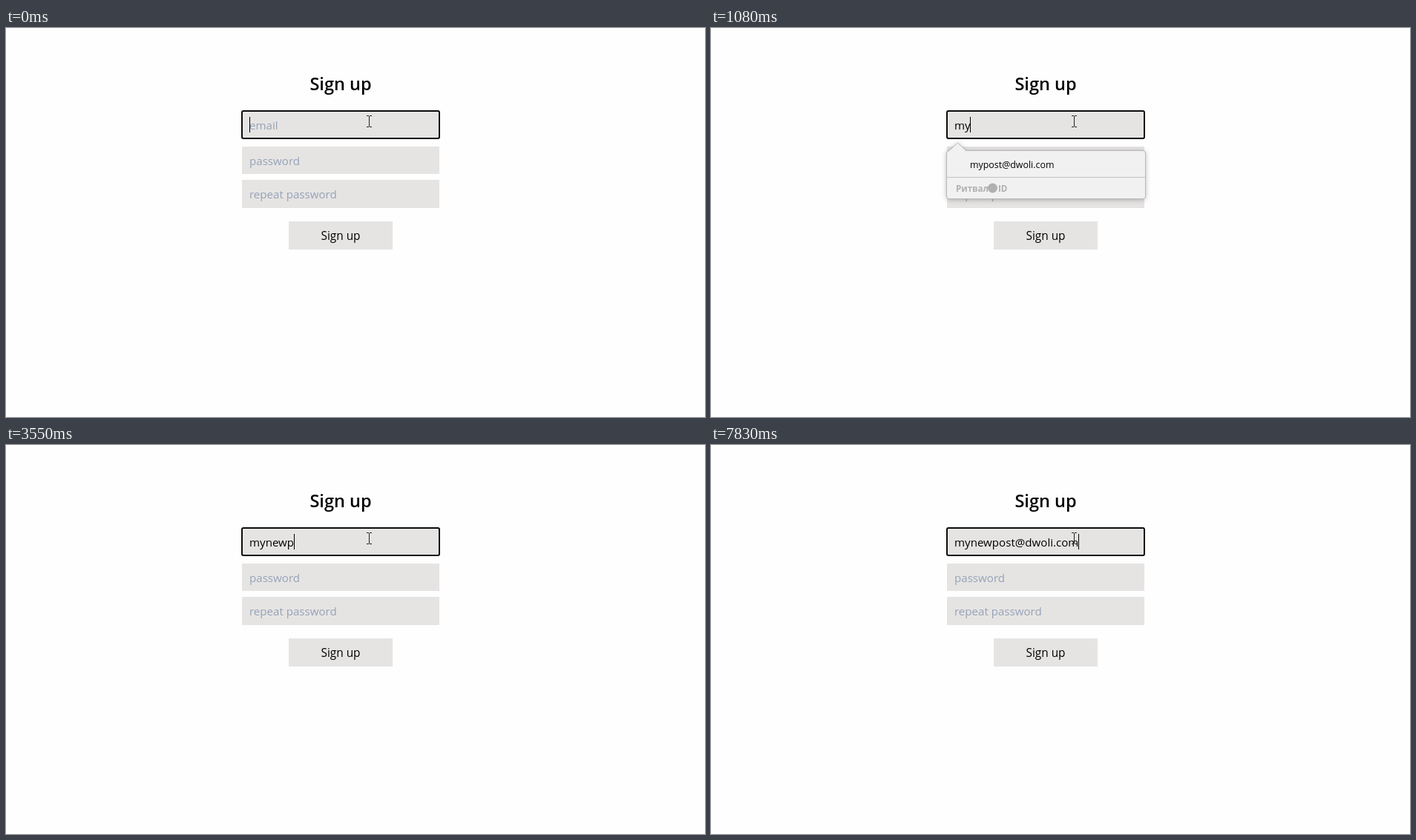
Recreate the animation shown at these times as an HTML page. Size 942x525 px, loop 8000 ms.

```html
<!DOCTYPE html>
<html lang="en">
<head>
<meta charset="utf-8">
<title>Sign up</title>
<style>
  html, body { margin: 0; width: 100%; height: 100%; overflow: hidden; background: #fefefe; }
  svg { display: block; width: 942px; height: 525px; font: 15.1px "Open Sans", "Noto Sans", sans-serif; }
  .box { fill: #e6e4e3; }
  .hint { fill: #94a3b8; }
  .mid { text-anchor: middle; }
  #popup { filter: drop-shadow(0 1px 3px rgba(0, 0, 0, .26)); }
  .panel { fill: #f1f1f1; stroke: #b8b8b8; }
  .brand { font-size: 11.6px; font-weight: 700; fill: #b0b0b0; }
</style>
</head>
<body>
<svg viewBox="0 0 942 525">
  <text class="mid" x="451" y="84" font-size="23.5" font-weight="600">Sign up</text>

  <rect class="box" x="318" y="112" width="266" height="37" rx="2" stroke="#0c0c0f" stroke-width="2"/>
  <rect class="box" x="318" y="160" width="266" height="37"/>
  <rect class="box" x="318" y="205" width="266" height="38"/>
  <rect class="box" x="381" y="261" width="140" height="38"/>

  <text id="email" x="328" y="137"></text>
  <text class="hint" x="328" y="185">password</text>
  <text class="hint" x="328" y="230">repeat password</text>
  <text class="mid" x="451" y="286" font-size="15.4">Sign up</text>
  <rect id="caret" y="120" width="1" height="21"/>

  <g id="popup">
    <rect class="panel" x="317.5" y="165.5" width="268" height="65" rx="3.5"/>
    <path class="panel" d="M320.5 166 L332.5 155 L344 166"/>
    <path d="M318 201.5 H585" stroke="#c2c2c2"/>
    <text x="349" y="189" font-size="12.4">mypost@dwoli.com</text>
    <text class="brand" x="330" y="220.5">Ритвал</text>
    <circle cx="379.5" cy="216" r="6.5" fill="#b0b0b0"/>
    <text class="brand" x="387" y="220.5">ID</text>
  </g>

  <path d="M486 118.5 h3 m1 0 h3 M489.5 119 V133 M486 133.5 h3 m1 0 h3" fill="none" stroke="#222"/>
</svg>
<script>
const LOOP = 8000, BLINK = 530, STEP = 70;
const ADDRESS = "mynewpost@dwoli.com";

// When each letter is typed; the caret's last blink began before the loop
const KEY_TIMES = [730, 1010, 2470, 2610, 3020, 3550, 3880, 3950, 4080, 5230,
                   5890, 6290, 6360, 6490, 6890, 7090, 7490, 7560, 7830];
const FIRST_BLINK = -130;

const [email, caret, popup] = ["email", "caret", "popup"].map(id => document.getElementById(id));
const clamp = v => Math.min(1, Math.max(0, v));
const stepsSince = (t, start) => Math.floor((t - start) / STEP);

function drawField(t) {
  const count = KEY_TIMES.filter(time => time <= t).length;
  const lastKey = count ? KEY_TIMES[count - 1] : FIRST_BLINK;
  email.textContent = count ? ADDRESS.slice(0, count) : "email";
  email.setAttribute("class", count ? "" : "hint");
  caret.setAttribute("x", 328 + Math.floor(count && email.getComputedTextLength()));
  caret.setAttribute("opacity", Math.floor((t - lastKey) / BLINK) % 2 ? 0 : 1);
}

function drawPopup(t) {
  const rest = 1 - clamp(stepsSince(t, 730) / 5);
  const leave = clamp(stepsSince(t, 2470) / 4);
  const scale = 1 - .18 * rest * rest;
  popup.setAttribute("transform", `translate(332 155) scale(${scale}) translate(-332 -155)`);
  popup.setAttribute("opacity", (1 - rest ** 3) * (1 - leave));
}

function tick() {
  const t = performance.now() % LOOP;
  drawField(t);
  drawPopup(t);
  requestAnimationFrame(tick);
}
tick();
</script>
</body>
</html>
```
